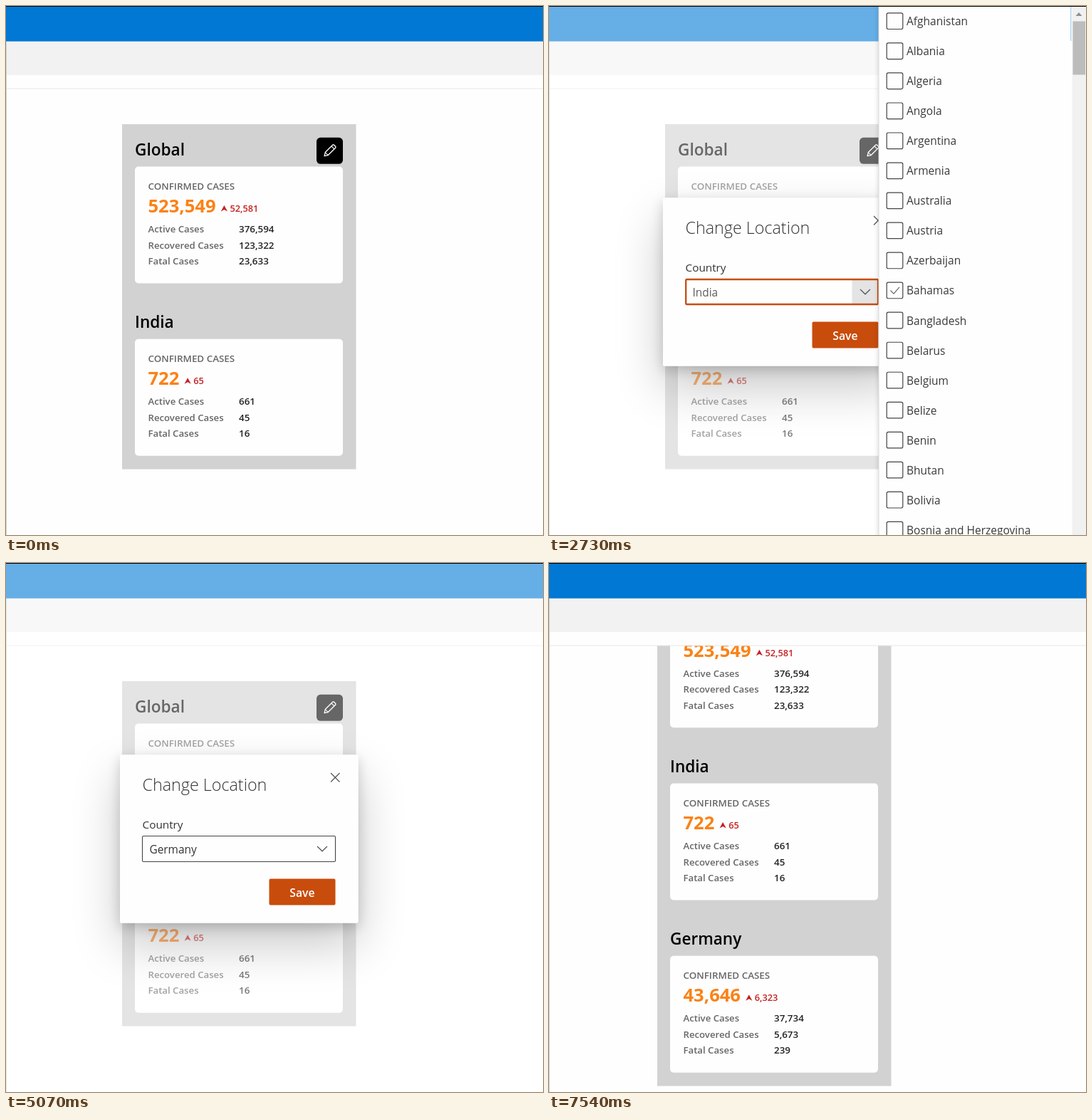
Animation, 754 px wide and 743 px high, one loop 8 s. Source, as an HTML page with a canvas:

```html
<!DOCTYPE html>
<html lang="en">
<head>
<meta charset="utf-8">
<title>Case tracker</title>
<style>
html, body { margin: 0; width: 100%; height: 100%; overflow: hidden; background: #fefefe; }
canvas { display: block; }
</style>
</head>
<body>
<canvas id="stage" width="754" height="743"></canvas>
<script>
const W = 754, H = 743, LOOP = 8000, STEP = 130;
const ctx = document.getElementById('stage').getContext('2d');
const FONT = '"Open Sans", "Noto Sans", sans-serif';
const ORANGE = '#c84c0c';
const SECTION = 242.3, ROW = 42.03;

const places = [
  { name: 'Global', total: '523,549', delta: '52,581', values: ['376,594', '123,322', '23,633'] },
  { name: 'India', total: '722', delta: '65', values: ['661', '45', '16'] },
  { name: 'Germany', total: '43,646', delta: '6,323', values: ['37,734', '5,673', '239'] }
];
const labels = ['Active Cases', 'Recovered Cases', 'Fatal Cases'];
const countries = ('Afghanistan,Albania,Algeria,Angola,Argentina,Armenia,Australia,Austria,Azerbaijan,' +
  'Bahamas,Bangladesh,Belarus,Belgium,Belize,Benin,Bhutan,Bolivia,Bosnia and Herzegovina,Botswana,' +
  'Brazil,Brunei,Bulgaria,Burkina Faso,Burundi,Cambodia,Cameroon,Canada,Central African Republic,' +
  'Chad,Chile,China,Colombia,Congo,Costa Rica,Croatia,Cuba,Cyprus,Czechia,Denmark,Djibouti,' +
  'Dominican Republic,Ecuador,Egypt,El Salvador,Equatorial Guinea,Eritrea,Estonia,Eswatini,Ethiopia,' +
  'Fiji,Finland,France,Gabon,Gambia,Georgia,Germany,Ghana,Greece,Guatemala,Guinea,Guyana,Haiti,' +
  'Honduras,Hungary,Iceland,India,Indonesia,Iran,Iraq').split(',');

// Last value whose start time has passed.
function stepAt(t, stops) {
  let value = stops[0][1];
  for (const [start, v] of stops) if (t >= start) value = v;
  return value;
}

function rect(x, y, w, h, color) {
  ctx.fillStyle = color;
  ctx.fillRect(x, y, w, h);
}

function round(x, y, w, h, r, fill, stroke, width = 1) {
  ctx.beginPath();
  ctx.roundRect(x, y, w, h, r);
  if (fill) { ctx.fillStyle = fill; ctx.fill(); }
  if (stroke) { ctx.strokeStyle = stroke; ctx.lineWidth = width; ctx.stroke(); }
}

function text(str, x, y, size, weight, color) {
  ctx.font = `${weight} ${size}px ${FONT}`;
  ctx.fillStyle = color;
  ctx.fillText(str, x, y);
  return ctx.measureText(str).width;
}

function line(points, color, width = 1, close = false) {
  ctx.beginPath();
  for (const [x, y] of points) ctx.lineTo(x, y);
  if (close) ctx.closePath();
  ctx.strokeStyle = color;
  ctx.lineWidth = width;
  ctx.stroke();
}

function fillPoly(points, color) {
  ctx.beginPath();
  for (const [x, y] of points) ctx.lineTo(x, y);
  ctx.fillStyle = color;
  ctx.fill();
}

function dot(x, y, r) {
  ctx.beginPath();
  ctx.arc(x, y, r, 0, Math.PI * 2);
  ctx.fillStyle = '#fff';
  ctx.fill();
}

function pencil(x, y) {
  round(x, y, 37, 37, 5.5, '#000');
  ctx.save();
  ctx.translate(x + 18.5, y + 18.5);
  ctx.rotate(Math.PI / 4);
  ctx.lineJoin = 'round';
  line([[-2.8, -9], [-1.8, -10], [1.8, -10], [2.8, -9], [2.8, 6], [0, 10.5], [-2.8, 6]], '#fff', 1.3, true);
  line([[-2.8, -6.2], [2.8, -6.2]], '#fff', 1.2);
  line([[-2.8, 6], [2.8, 6]], '#fff', 1);
  ctx.restore();
}

function section(place, x, y) {
  text(place.name, x + 18, y + 44, 22.6, 600, '#000');
  round(x + 18, y + 59.5, 292, 164, 5, '#fefefe');
  const left = x + 36.5;
  text('CONFIRMED CASES', left, y + 92, 13.4, 600, '#666');
  const w = text(place.total, left, y + 124, 25.6, 700, '#fb8216');
  const ax = left + w + 11.8;
  fillPoly([[ax, y + 114], [ax + 4.6, y + 122.5], [ax, y + 120], [ax - 4.6, y + 122.5]], '#c4201f');
  text(place.delta, ax + 8, y + 123, 12.8, 600, '#c4201f');
  labels.forEach((label, i) => {
    const by = y + 152 + i * 22.5;
    text(label, left, by, 13.2, 600, '#666');
    text(place.values[i], x + 164, by, 13.4, 600, '#222');
  });
}

// Progress along the curve cubic-bezier(0, 1, 1, 0).
function snapEase(x) {
  let lo = 0, hi = 1;
  for (let i = 0; i < 24; i++) {
    const s = (lo + hi) / 2;
    if (3 * s * s - 2 * s * s * s < x) lo = s; else hi = s;
  }
  return 3 * (1 - lo) ** 2 * lo + lo ** 3;
}

function loader(t) {
  const p = snapEase(((t - 5223) % 600) / 600);
  const x = 298, y = 472.8, gap = 28, r = 7.7;
  dot(x, y, r * p);
  dot(x + gap * p, y, r);
  dot(x + gap * (1 + p), y, r);
  dot(x + gap * 2, y, r * (1 - p));
}

function page(t) {
  const loading = t >= 5460 && t < 6370;
  const count = loading ? 1 : t >= 6370 ? 3 : 2;
  const scroll = stepAt(t, [[0, 0], [7280, 50], [7410, 115], [7540, 158.3]]);
  const x = count === 3 ? 152 : 163;
  const y = 166 - scroll;
  rect(0, 0, W, H, '#fefefe');
  rect(x, y, 328.5, loading ? 377.5 : count * SECTION, '#d2d2d2');
  places.slice(0, count).forEach((p, i) => section(p, x, y + i * SECTION));
  pencil(x + 273, y + 18.8);
  if (loading) loader(t);

  rect(0, 0, W, 116, '#fefefe');
  rect(0, 115.5, W, 1, '#e8e8e8');
  rect(0, 50, W, 47, '#f2f2f2');
  rect(0, 1, W, 48.7, '#0078d4');
  rect(0, 50, 1, H - 50, '#d0d0d0');
}

function shadow(x, y, w, h, dy, blur, alpha) {
  ctx.save();
  ctx.shadowColor = `rgba(0,0,0,${alpha})`;
  ctx.shadowBlur = blur;
  ctx.shadowOffsetY = dy;
  round(x, y, w, h, 2, '#fff');
  ctx.restore();
}

function dialog(t) {
  const focused = t >= 2210 && t < 5070;
  const open = t >= 2470 && t < 4680;
  const picked = t >= 4160;
  shadow(160, 269.5, 334.5, 236, 30, 67, 0.22);
  shadow(160, 269.5, 334.5, 236, 5.6, 17, 0.18);
  round(160, 269.5, 334.5, 236, 2, '#fefefe');
  text('Change Location', 191.5, 320, 23.3, 300, '#333');
  line([[456, 295], [468.5, 307.5]], '#555', 1.2);
  line([[468.5, 295], [456, 307.5]], '#555', 1.2);
  text('Country', 191.5, 372.5, 15.3, 400, '#333');

  if (t >= 1820 && t < 5070) rect(focused ? 425.5 : 428, 384, 36, 35, focused ? '#e4e4e4' : '#f3f3f3');
  if (focused) round(192.2, 384, 269.8, 35, 1.5, null, ORANGE, 2.3);
  else round(191.5, 383.5, 271, 36, 1.5, null, '#444', 1.1);
  line([[437, 398], [444, 404.8], [451, 398]], '#555', 1.2);

  const selected = picked && open;
  if (selected) rect(202, 390.5, 65.5, 22.5, '#3390ff');
  text(picked ? 'Germany' : 'India', 201.5, 408, 15.4, 400, selected ? '#fff' : focused ? '#5c5c5c' : '#333');

  round(369.5, 443.5, 93, 37, 2, ORANGE);
  text('Save', 398.3, 468.5, 15.7, 600, '#fff');
}

function checkbox(y, hover) {
  round(474.2, y - 11.3, 22.6, 22.6, 2.2, '#fefefe', '#444', 1.2);
  if (hover) line([[479.5, y], [484, y + 4.6], [492, y - 4.6]], '#666', 1.2);
}

function list(t) {
  const scroll = stepAt(t, [[0, 0], [2990, 420], [3120, 860], [3380, 1300], [3510, 44 * ROW], [4160, 0]]);
  const hover = stepAt(t, [[0, -1], [2730, 9], [2990, -1], [3770, 55], [4160, 11]]);
  ctx.save();
  ctx.beginPath();
  ctx.rect(440, 1, W - 440, H - 1);
  ctx.clip();
  shadow(463, -20, 310, H + 40, 0, 7, 0.2);
  rect(463, 1, 291, H, '#fefefe');
  rect(462.5, 1, 1, H, '#dcdcdc');
  countries.forEach((name, i) => {
    const y = 21.2 + i * ROW - scroll;
    if (y < -20 || y > H + 20) return;
    checkbox(y, i === hover);
    text(name, 502, y + 6, 15.5, 400, '#3a3a3a');
  });
  rect(732.3, 1, 1, 48, '#8fc0e8');
  rect(734.5, 1, 19.5, H, '#f1f1f1');
  rect(735.5, 21.5 + scroll * 0.101, 17.5, 75, '#bcbcbc');
  fillPoly([[744, 9], [748.5, 14], [739.5, 14]], '#909090');
  ctx.restore();
}

function faded(alpha, draw) {
  ctx.globalAlpha = alpha;
  draw();
  ctx.globalAlpha = 1;
}

function draw(ms) {
  const t = Math.floor(ms / STEP + 1e-6) * STEP;
  page(t);
  if (t >= 910 && t < 5590) {
    const alpha = t >= 5460 ? 0.5 : 1;
    faded(0.4 * alpha, () => rect(0, 0, W, H, '#fff'));
    faded(alpha, () => dialog(t));
  }
  if (t >= 2470 && t < 4680) faded(t < 2600 ? 0.6 : 1, () => list(t));
  rect(0, 0, W, 1, '#000');
}

let start = null;
function tick(now) {
  if (start === null) start = now;
  draw((now - start) % LOOP);
  requestAnimationFrame(tick);
}
requestAnimationFrame(tick);
</script>
</body>
</html>
```
